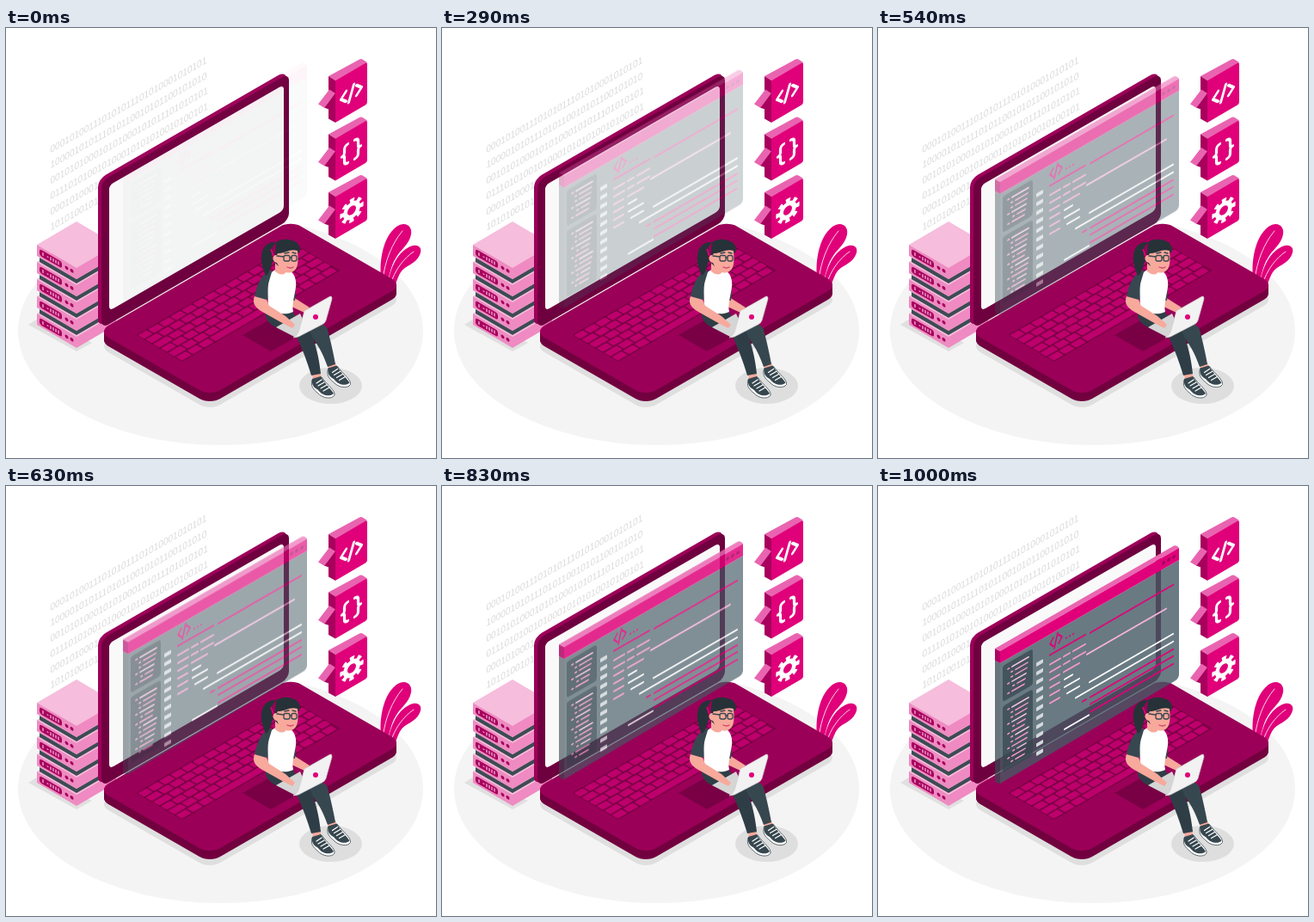
These frames come from a looping animation (500 px wide and 500 px high, 1.04 s). An HTML page:

```html
<!DOCTYPE html>
<html lang="en">
<head>
<meta charset="utf-8">
<title>Coding scene</title>
<style>
html, body { margin: 0; width: 100%; height: 100%; overflow: hidden; background: #fff; }
svg { display: block; width: 100%; height: 100%; }
.digits { font: 11.65px "Liberation Sans", Arial, sans-serif; fill: #dadada; }
.line { fill: none; stroke-linecap: round; stroke-linejoin: round; }
#panel { animation: slide 1040ms linear infinite; }
@keyframes slide {
  0% { opacity: .04; transform: translateY(-28.8px); }
  96.154%, 100% { opacity: 1; transform: translateY(0); }
}
</style>
</head>
<body>
<svg viewBox="0 0 500 500">
  <defs>
    <g id="server">
      <path fill="#f6bddc" d="M36 252 82 225 128 252 82 279Z"/>
      <path fill="#ed8cc1" d="M36 252 82 279V292L36 265Z"/>
      <path fill="#f08ac2" d="M82 279 128 252V265L82 292Z"/>
      <g transform="matrix(1 .577 0 1 36 252)" fill="#a8005d">
        <rect x="3" y="3.2" width="26" height="7.6" rx="2.5"/>
        <circle cx="34.5" cy="7" r="2"/><circle cx="40.5" cy="7" r="2"/>
        <path class="line" stroke="#f9c9e3" stroke-width="1.2" d="M7 5.5v3M12 7h1M16 5.5v3M19 5.5v3M22 5.5v3M25 5.5v3"/>
      </g>
    </g>
    <path id="slab" fill="#3d4c54" d="M39 267 82 292 125 267V272L82 297 39 272Z"/>
    <g id="bubble">
      <path fill="#e964b0" d="M375 56 411 36.500Q413 35.500 415 36.800L420 40 383 61Z"/>
      <path fill="#a8005d" d="M375 56 383 61V110L375 105.500Z"/>
      <path fill="#e964b0" d="M363 88.500 376 71.500 383 76 371 93Z"/>
      <path fill="#a8005d" d="M363 88.500 371 93 383 97V76L370.500 92.500Z"/>
      <path fill="#e0007a" d="M383 61 418 40.800Q420 40 420 42V86Q420 88 418 89.500L383 110Z"/>
    </g>
    <g id="shoe">
      <path fill="#fff" stroke="#37474f" stroke-width=".8" d="M356 409C354 416 357 420 362 424 368 431 379 432 382 427 383 421 374 416 367 406Z"/>
      <path fill="#37474f" d="M356 408C355 415 358 418 363 421 368 428 377 429 381 425 377 419 372 415 366 405Z"/>
      <path class="line" stroke="#fff" stroke-width="1.3" d="M361 413 367 409M363 416 370 412M366 419 373 415M369 422 376 418"/>
    </g>
  </defs>

  <ellipse cx="249.500" cy="352" rx="235.500" ry="133" fill="#f4f4f4"/>
  <g id="code" class="digits"></g>

  <path fill="#e0e0e0" d="M26 345 40 336 100 366 82 376Z"/>
  <g id="servers"></g>

  <g fill="#e0007a">
    <path d="M437 297C433 276 437 244 454 231 464 224 473 230 471 240 469 252 458 258 453 268 447 277 446 290 441 302Z"/>
    <path d="M443 303C446 282 453 262 470 254 480 250 485 256 481 264 476 275 464 276 459 284 455 290 454 297 451 301Z"/>
    <path class="line" stroke="#fbd3e8" stroke-width="1" d="M438 294C440 272 449 250 461 236M447 298C452 282 462 268 474 260"/>
  </g>

  <!-- laptop -->
  <g id="base"></g>
  <g transform="matrix(1 -.577 0 1 107 176)">
    <rect width="219" height="172" rx="9" fill="#9d0059"/>
    <rect x="4" y="4.600" width="218" height="171" rx="8" fill="#6f003f"/>
    <rect x="13" y="14.500" width="203" height="146" rx="5" fill="#f9f9f9"/>
  </g>
  <g id="keys" transform="matrix(1 -.577 1 .577 153 357)">
    <rect x="-1" y="-1" width="184" height="54" rx="2" fill="#7d0047"/>
  </g>
  <path fill="#790045" d="M275 357 312 336 346 355 308 376Z"/>

  <!-- floating window -->
  <g id="panel">
    <path fill="#37474f" fill-opacity=".75" d="M136 203 142 206V346Q136 346 136 342Z"/>
    <path fill="#b30064" d="M136 189 142 192V206L136 203Z"/>
    <path fill="#ea66b1" d="M136 189 344 69.500Q346 69 348 70L350 72 142 192Z"/>
    <g transform="matrix(1 -.577 0 1 142 192)">
      <path fill="#455a64" fill-opacity=".8" d="M0 14H208V147Q208 152 203 152L0 154Z"/>
      <path fill="#e0007a" d="M0 0H208V14H0Z"/>
      <g fill="#9b0058">
        <circle cx="190" cy="7" r="1.900"/><circle cx="196" cy="7" r="1.900"/><circle cx="202" cy="7" r="1.900"/>
      </g>
      <g fill="#37474f" fill-opacity=".75">
        <rect x="3" y="19" width="35" height="42" rx="3"/>
        <rect x="3" y="66" width="35" height="77" rx="3"/>
      </g>
      <g id="rows" class="line" stroke-width="2"></g>
      <path class="line" stroke="#e0007a" stroke-width="1.700" d="M62 20 58 25 62 30M67 17 63 33M68 20 72 25 68 30"/>
      <path class="line" stroke="#e0007a" stroke-width="2" d="M77 29h.1M81 29h.1M85 29h.1"/>
    </g>
  </g>

  <use href="#bubble"/>
  <use href="#bubble" y="67.500"/>
  <use href="#bubble" y="135"/>
  <g class="line" stroke="#fff" stroke-width="3.200">
    <path transform="matrix(1 -.577 0 1 401.500 76)" d="M-6-6-12 0-6 6M3-9-3 9M6-6 12 0 6 6"/>
    <path transform="matrix(1 -.577 0 1 401.500 143.500)" d="M-4-11Q-8-11-8-7V-3Q-8 0-11 0-8 0-8 3V7Q-8 11-4 11M4-11Q8-11 8-7V-3Q8 0 11 0 8 0 8 3V7Q8 11 4 11"/>
  </g>
  <g transform="matrix(1 -.577 0 1 402 212)" fill="none" stroke="#fff">
    <circle r="7.500" stroke-width="5"/>
    <circle r="11.500" stroke-width="4.500" stroke-dasharray="5 4.032" transform="rotate(-12)"/>
  </g>

  <!-- woman -->
  <ellipse cx="377.500" cy="416" rx="36.500" ry="21" fill="#dedede"/>
  <g fill="#f7a99c">
    <path d="M356 400 365 399 367 408 357 411ZM374 390 383 389 385 396 375 399Z"/>
  </g>
  <use href="#shoe"/>
  <use href="#shoe" x="18.500" y="-12.500"/>
  <path fill="#37474f" d="M341 348C356 341 372 342 374 351 378 366 381 380 383 391L374 394C369 380 364 370 356 360Z"/>
  <path fill="#2f3e46" d="M304 325C298 337 306 345 318 350L338 359C344 372 350 387 355 404L366 402C364 384 360 366 354 354 346 342 335 336 333 328Z"/>
  <path fill="#f7a99c" d="M334 313 353 325 347 331 332 324Z"/>
  <path fill="#37474f" d="M310 282C298 283 292 298 289 312L303 317 311 302ZM330 283C336 288 338 302 336 317L331 316Z"/>
  <path fill="#fff" d="M309 284C314 279 322 279 328 281 335 284 338 292 337 301 336 310 332 321 334 330 324 335 312 331 304 326 306 316 303 303 306 294Z"/>
  <path fill="#f7a99c" d="M313 269 325 278 325 285Q320 289 313 283Z"/>
  <path fill="#263238" d="M314 249C304 248 298 255 297 264 296 274 299 281 302 288 308 285 307 275 312 269ZM309 264C307 251 318 244 328 246 338 247 344 253 341 261L317 277Q310 272 309 264Z"/>
  <path fill="#f7a99c" d="M316 262C324 262 331 256 339 259 340 270 340 280 334 283 328 287 320 283 317 277L315 273C309 272 309 263 315 264Z"/>
  <g class="line" stroke="#37474f" stroke-width="1.300">
    <rect x="323" y="264.500" width="7" height="6.500" rx="2"/>
    <rect x="332" y="264.500" width="6" height="6.500" rx="2"/>
    <path d="M315 265 323 266M330 267h2M324 262l5-1M333 261l4 1"/>
    <path stroke="#d23c72" d="M327 278Q331 280 334 278"/>
  </g>
  <path stroke="#e0007a" stroke-width="1.500" d="M308 257 311 265"/>
  <path fill="#d5d5d5" d="M314 348 342 332 350 350 337 360Z"/>
  <path fill="#f7a99c" d="M289 312C286 319 289 325 298 330L323 344 333 349 336 345 325 335 306 323 303 316Z"/>
  <path fill="#f2f2f2" stroke="#d0d0d0" stroke-width=".7" d="M347 329 377 312Q379 311.500 379 315L372 340Q371 343 368 344.500L340 359 334 360Q339 358 341 351Z"/>
  <circle cx="360" cy="336" r="3" fill="#e0007a"/>
</svg>
<script>
const byId = id => document.getElementById(id);

function add(parent, name, attrs, text) {
  const el = document.createElementNS("http://www.w3.org/2000/svg", name);
  for (const key in attrs) el.setAttribute(key, attrs[key]);
  if (text) el.textContent = text;
  return byId(parent).appendChild(el);
}

[
  "000101001110101011101010001010101",
  "100001010111010110010101100101010",
  "001010100010101000101011101010101",
  "011101010010100010101010010100101",
  "000101000101010010",
  "101010010100101"
].forEach((row, i) => add("code", "text", {
  transform: `matrix(.866 -.5 0 1 51.500 ${145.5 + i * 18.1})`
}, row));

for (let i = 4; i >= 0; i--) {
  if (i < 4) add("servers", "use", { href: "#slab", y: i * 20 });
  add("servers", "use", { href: "#server", y: i * 20 });
}

const slice = (y, fill) => add("base", "rect", {
  x: -4, y: -4, width: 224, height: 130, rx: 12, fill,
  transform: `matrix(1 -.577 1 .577 115 ${353 + y})`
});
slice(17, "#dfdfdf");
for (let y = 10; y > 0; y--) slice(y, "#72003f");
slice(0, "#9b0058");

const key = (x, y, width) => add("keys", "rect", { x, y, width, height: 7, rx: 1.2, fill: "#bd006c" });
for (let r = 0; r < 6; r++) {
  const y = r * 8.8 + .5;
  if (r === 5) {
    [0, 13, 26].forEach(x => key(x, y, 11.3));
    key(39, y, 63);
    for (let x = 104; x < 180; x += 13) key(x, y, 11.3);
    continue;
  }
  const first = 10 + r * 3 % 8;
  key(0, y, first);
  let x = first + 1.7;
  for (; x < 163; x += 13) key(x, y, 11.3);
  key(x, y, 182 - x);
}

const PINK = "#f59acb", WHITE = "#fff", MAGENTA = "#e0007a";
const stroke = (x1, x2, y, color, width = 2) => add("rows", "path", {
  d: `M${x1} ${y}H${x2}`, stroke: color, "stroke-width": width
});

// file tree
function tree(top, count) {
  for (let i = 0; i < count; i++) {
    const y = top + i * 5.7, indent = [0, 4, 4, 0, 6][i % 5];
    stroke(9 + indent, 10.5 + indent, y, PINK, 1.7);
    stroke(14 + indent, 33 - i * 7 % 6, y, i % 3 ? PINK : "#f9c6e1", 1.7);
  }
}
tree(26, 6);
tree(73, 12);

for (let i = 0; i < 11; i++) {
  add("rows", "rect", { x: 42, y: 38 + i * 10.4, width: 8, height: 4.4, rx: .8, fill: "#d3d9dc" });
}

[
  [105, 201, 39, MAGENTA], [58, 99, 38, MAGENTA],
  [58, 70, 49, PINK], [74, 81, 49, PINK], [85, 99, 49, PINK],
  [58, 70, 58, PINK], [74, 81, 58, PINK], [85, 99, 58, PINK],
  [101, 193, 62, "#f8b4d8"],
  [58, 69, 67, PINK], [74, 92, 67, PINK],
  [58, 69, 76, PINK], [75, 84, 76, WHITE],
  [58, 69, 85, PINK], [75, 92, 85, WHITE],
  [58, 69, 94, PINK], [78, 92, 94, WHITE],
  [104, 201, 96, WHITE], [88, 201, 105, WHITE],
  [96, 100, 114, MAGENTA], [105, 201, 114, MAGENTA],
  [105, 201, 122, MAGENTA], [105, 201, 131, MAGENTA],
  [75, 103, 134, WHITE]
].forEach(args => stroke(...args));
</script>
</body>
</html>
```
